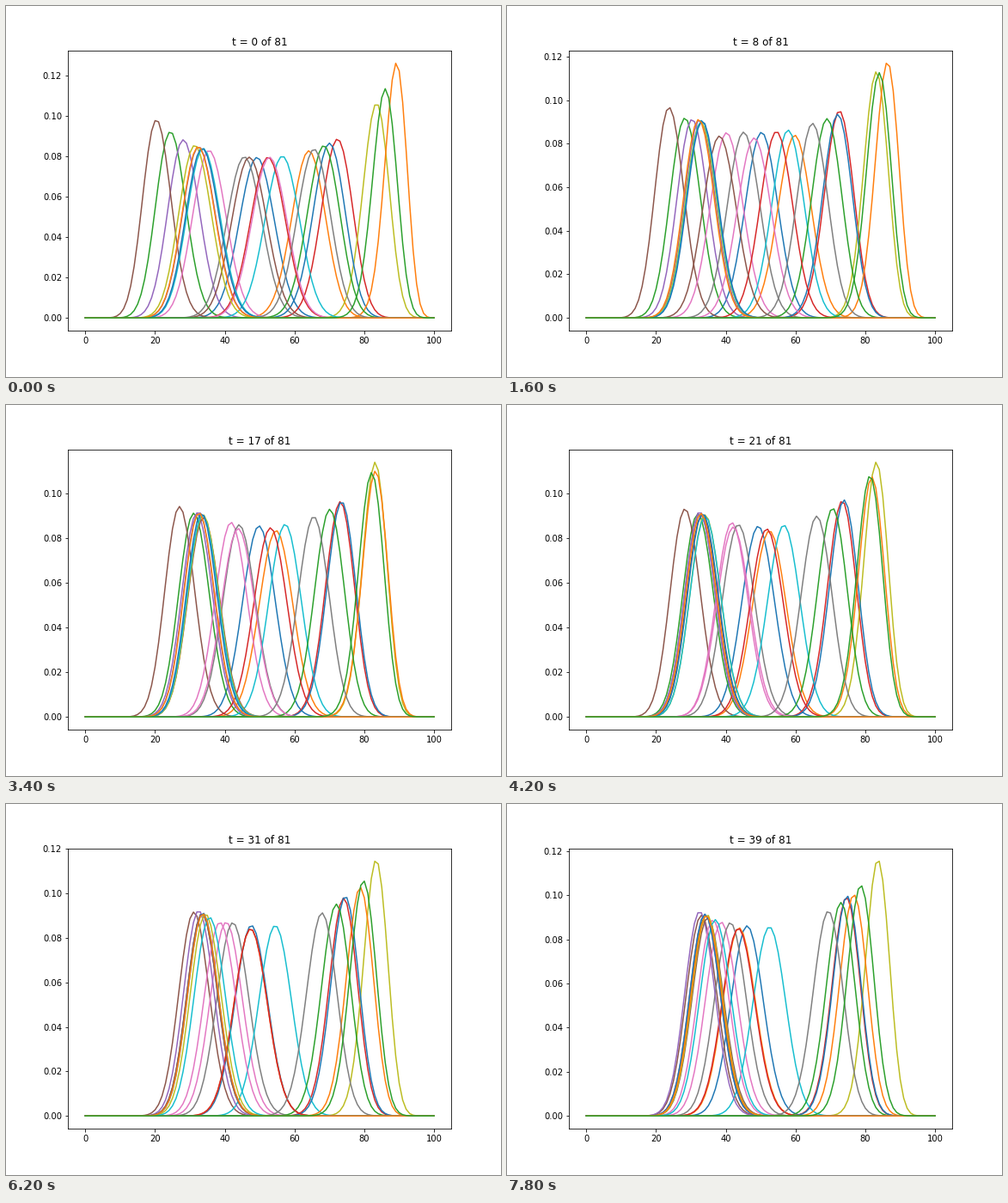
A matplotlib script for the animation above (8 s loop, 576 by 432 pixels).

```python
import numpy as np
import matplotlib.pyplot as plt
from matplotlib.animation import FuncAnimation

FRAMES, TOTAL, STEP_MS = 40, 81, 200
N = 100
x = np.arange(N + 1)
log_fact = np.concatenate([[0], np.cumsum(np.log(np.arange(1, N + 1)))])
log_comb = log_fact[N] - log_fact - log_fact[::-1]

# Where each agent's opinion peaks at the start, on the way and at the end
KEY_STEPS = np.array([0, 17, 39])
START = [49.2, 64.1, 24.4, 72.3, 28.1, 20.4, 35.5, 45.6, 83.5, 56.5, 70.0, 89.2,
         68.4, 52.4, 32.5, 47.0, 52.8, 65.6, 31.4, 33.8, 33.5, 32.4, 86.0]
MIDWAY = [49.8, 54.7, 31.1, 73.1, 32.0, 27.0, 41.8, 44.1, 83.1, 57.3, 73.5, 83.2,
          70.1, 53.1, 32.5, 33.9, 43.8, 65.5, 33.8, 33.6, 33.3, 32.6, 82.1]
END = [46.1, 43.8, 34.3, 74.6, 34.0, 33.0, 38.7, 41.3, 83.6, 52.5, 74.8, 76.7,
       73.0, 43.6, 32.5, 34.8, 36.3, 69.4, 34.6, 37.0, 34.0, 34.4, 78.7]


def slowing(t):
    return 1 - np.exp(-t / 40)


COEFS = np.polyfit(slowing(KEY_STEPS), [START, MIDWAY, END], 2)


def peak_at(t):
    s = slowing(t)
    return COEFS[0] * s * s + COEFS[1] * s + COEFS[2]


def sharpness(t, p):
    """Opinions narrow once pooling starts, less so while they move."""
    speed = np.abs(peak_at(t + 0.5) - peak_at(t - 0.5)) / (p * (1 - p))
    settled = 0.07 + 0.0006 * t - 0.017 * speed
    return (1 + (1 - np.exp(-t / 2)) * settled) ** 2


def curves_at(t):
    p = (peak_at(t) + 0.5) / (N + 1)
    k = sharpness(t, p)[:, None]
    p = p[:, None]
    w = np.exp(k * (log_comb + x * np.log(p) + (N - x) * np.log(1 - p)))
    return w / w.sum(axis=1, keepdims=True)


plt.rcParams.update({"font.family": "DejaVu Sans", "font.size": 10})
fig, ax = plt.subplots(figsize=(8, 6), dpi=72)
fig.subplots_adjust(left=0.125, right=0.9, bottom=0.125, top=0.88)
lines = [ax.plot(x, 0 * x, color=f"C{i % 10}", lw=1.5)[0]
         for i in range(len(START))]
ax.set_xlim(-5, 105)
title = ax.set_title("")


def update(t):
    ys = curves_at(t)
    for line, y in zip(lines, ys):
        line.set_ydata(y)
    ax.set_ylim(-0.05 * ys.max(), 1.05 * ys.max())
    title.set_text(f"t = {t} of {TOTAL}")
    return lines


anim = FuncAnimation(fig, update, frames=FRAMES, interval=STEP_MS,
                     init_func=lambda: update(0), repeat=True, repeat_delay=0)
plt.show()
```
